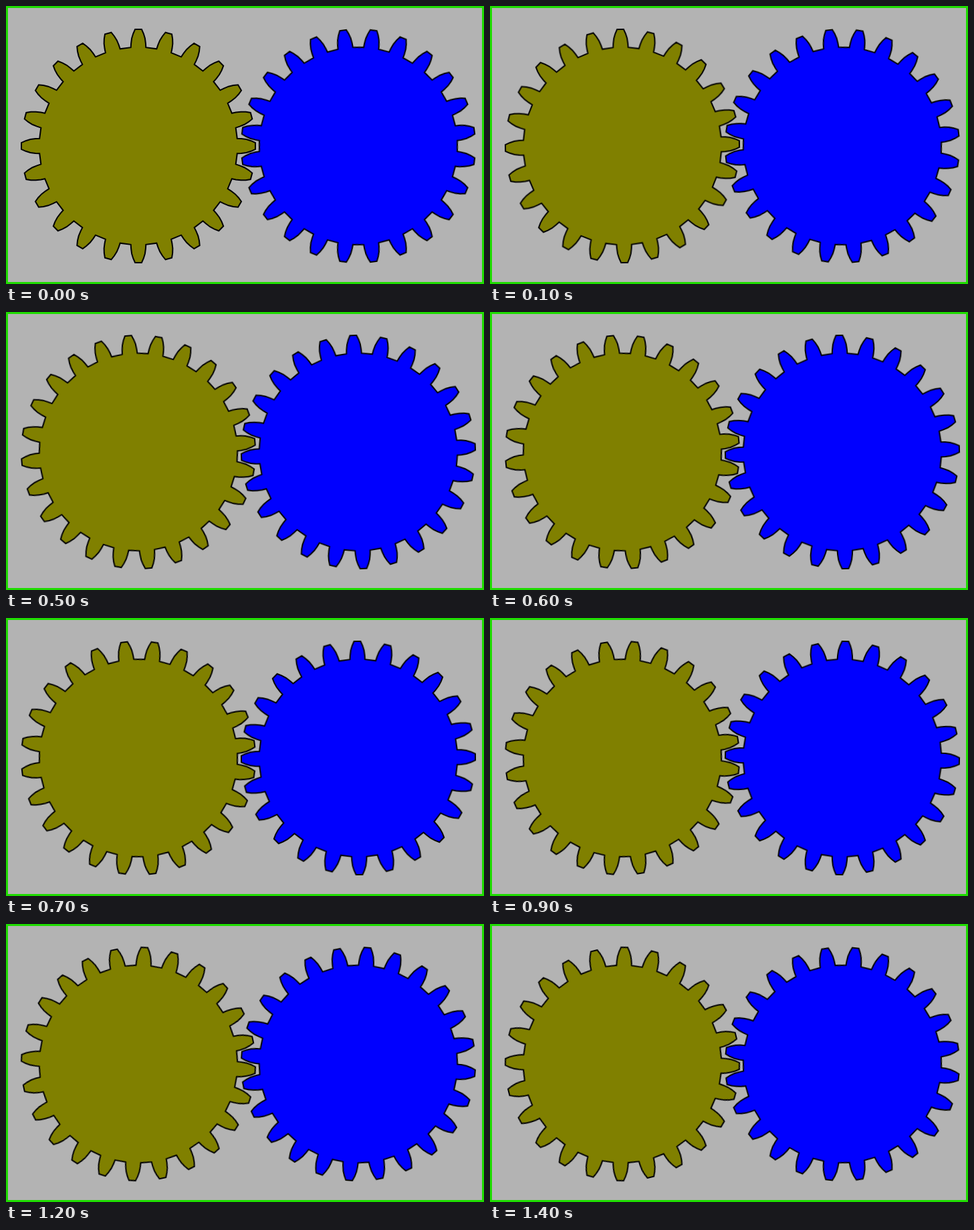
An HTML page for the animation above (1500 ms loop, 715 px wide and 417 px high).

```html
<!DOCTYPE html>
<html lang="en">
<head>
<meta charset="utf-8">
<title>Meshing gears</title>
<style>
  html, body { margin: 0; width: 100%; height: 100%; overflow: hidden; background: #b3b3b3; }
  svg { display: block; width: 715px; height: 417px; }
  .gear { stroke: #000; stroke-width: 2; animation: turn 1.5s steps(15) infinite; }
  .left { fill: #808000; --turn: -15deg; }
  .right { fill: #00f; --turn: 15deg; }
  @keyframes turn { to { transform: rotate(var(--turn)); } }
</style>
</head>
<body>
<svg viewBox="0 0 715 417">
  <rect width="715" height="417" fill="#b3b3b3"/>
  <g transform="translate(198 210)"><path class="gear left"/></g>
  <g transform="translate(527 210) rotate(-7.5)"><path class="gear right"/></g>
  <rect x="1.5" y="1.5" width="712" height="414" fill="none" stroke="#1fdc00" stroke-width="3"/>
</svg>
<script>
  const TEETH = 24;
  // Right flank of a tooth, root to tip: [half width, distance from centre]
  const flank = [[11.3, 147.8], [10.9, 154], [9.9, 161.5], [7.8, 168.5], [4.9, 175]];
  const tooth = [
    ...flank.map(([x, r]) => [-x, -r]),
    ...flank.map(([x, r]) => [x, -r]).reverse()
  ];

  function rotate([x, y], a) {
    const c = Math.cos(a), s = Math.sin(a);
    return [(x * c - y * s).toFixed(2), (x * s + y * c).toFixed(2)];
  }

  const points = [];
  for (let i = 0; i < TEETH; i++) {
    for (const p of tooth) points.push(rotate(p, i * 2 * Math.PI / TEETH));
  }
  const outline = 'M' + points.join('L') + 'Z';
  document.querySelectorAll('.gear').forEach(g => g.setAttribute('d', outline));
</script>
</body>
</html>
```
